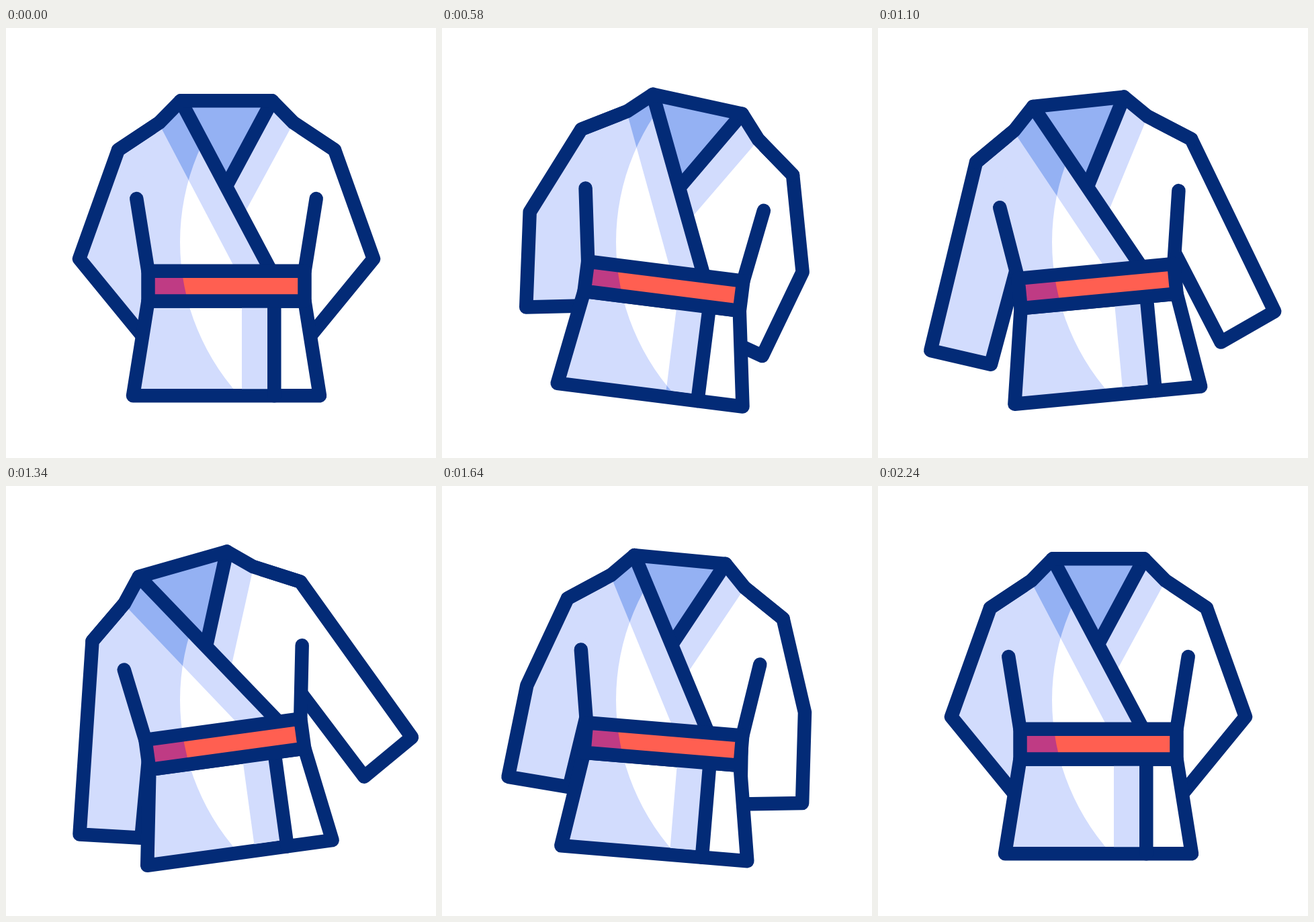
An HTML page with a canvas that plays this animation: 640x640 px, repeating every 2.62 s.

```html
<!DOCTYPE html>
<html lang="en">
<head>
<meta charset="utf-8">
<title>Kimono</title>
<style>
  html, body { margin: 0; width: 100%; height: 100%; overflow: hidden; background: #fff; }
  canvas { display: block; }
</style>
</head>
<body>
<canvas id="stage" width="640" height="640"></canvas>
<script>
const SIZE = 640, MID = 328, LOOP = 2620, STEP = 20, RAD = Math.PI / 180;
const INK = '#032b77';
const LIT = { cloth: '#fff', band: '#d2dcfd', lining: '#94b1f3', belt: '#ff5f51' };
const SHADE = { cloth: '#d2dcfd', band: '#94b1f3', lining: '#94b1f3', belt: '#bf3b84' };
const FOLD = 59; // elbow angle at rest

const stage = document.getElementById('stage').getContext('2d');
const layer = document.createElement('canvas');
layer.width = layer.height = SIZE;
const shaded = layer.getContext('2d');
let ctx = stage;

// Motion
const clamp = x => Math.min(1, Math.max(0, x));
const ease = (t, t0, t1) => (1 - Math.cos(Math.PI * clamp((t - t0) / (t1 - t0)))) / 2;

const swing = t => 8.2 * ease(t, 110, 720) - 17 * ease(t, 720, 1260)
  + 15.1 * ease(t, 1260, 1740) - 6.3 * ease(t, 1740, 2115);

const elbowBend = t =>
  FOLD * (1 - ease(t, 120, 1080) + clamp((t - 1380) / 850) ** 1.17);

// Points are measured from the vertical middle line
function turn([x, y], deg, cy) {
  const c = Math.cos(deg * RAD), s = Math.sin(deg * RAD);
  return [x * c - (y - cy) * s, cy + x * s + (y - cy) * c];
}
const polar = ([x, y], deg, r) => [x + r * Math.cos(deg * RAD), y + r * Math.sin(deg * RAD)];
const mirror = points => points.map(([x, y]) => [-x, y]);
const box = (x0, y0, x1, y1) => [[x0, y0], [x1, y0], [x1, y1], [x0, y1]];

function trace(points, closed) {
  ctx.beginPath();
  for (const [x, y] of points) ctx.lineTo(MID + x, y);
  if (closed) ctx.closePath();
}
function fill(points, color) {
  trace(points, true);
  ctx.fillStyle = color;
  ctx.fill();
}
function line(points, closed) {
  trace(points, closed);
  ctx.stroke();
}
function shape(points, color) {
  fill(points, color);
  line(points, true);
}

const COLLAR = [68, 108.3], NECK = [100, 141], SHOULDER = [161, 181.5], CROSS = [0, 235];
const RIGHT_HALF = [COLLAR, NECK, SHOULDER];
const WAIST = 116.5, BELT_TOP = 361.8, BELT_LOW = 406.4, HEM = 547.3, SLIT = 71.3;

function sleeve(side, bend) {
  const right = side > 0, slope = 70.3;
  const drift = side * 1.7 * Math.sin(Math.PI * bend / FOLD);
  const arm = slope + bend + drift;
  const elbow = polar(SHOULDER, slope + Math.max(0, drift), 142.5 + 0.0194 * (bend - 20) ** 2);
  const wrist = polar(elbow, arm, (right ? 134.5 : 138) + 0.004 * bend ** 2);
  const cuff = polar(wrist, arm + (right ? 86 : 90.5) + 0.1 * bend, 92);
  const points = [NECK, SHOULDER, elbow, wrist, cuff, [114, 335]];
  return right ? points : mirror(points);
}

function drawSuit(target, t, ink) {
  ctx = target;
  ctx.fillStyle = '#fff';
  ctx.fillRect(0, 0, SIZE, SIZE);
  ctx.lineWidth = 20.5;
  ctx.lineJoin = ctx.lineCap = 'round';
  ctx.strokeStyle = INK;

  // The chest follows the hips a little later
  const hips = swing(t), chest = 0.93 * swing(t - 100), bend = elbowBend(t);
  const low = points => points.map(p => turn(p, hips, 400));
  const up = points => low(points.map(p => turn(p, chest, 290)));

  for (const side of [-1, 1]) {
    const arm = up(sleeve(side, bend));
    fill(arm, ink.cloth);
    line(arm);
  }

  const seam = [[133.7, 254], [WAIST, BELT_TOP]];
  const seamR = low(seam), seamL = low(mirror(seam));
  const neckline = mirror(RIGHT_HALF).reverse().concat(RIGHT_HALF);
  fill([...up(neckline.slice(1, -1)), ...seamR, ...seamL.slice().reverse()], ink.cloth);
  fill(up([[-68, 108], [-101, 141], [24, 379], [76, 379]]), ink.band);
  fill(up([COLLAR, NECK, [24, 281], CROSS]), ink.band);
  fill(up([...mirror([COLLAR]), COLLAR, CROSS]), ink.lining);
  line(up([COLLAR, CROSS]));
  line(up([...mirror([COLLAR]), [74, 376]]));
  line(up(neckline));
  line(seamL);
  line(seamR);

  shape(low([[-WAIST, BELT_LOW], [WAIST, BELT_LOW], [139, HEM], [-139, HEM]]), ink.cloth);
  fill(low(box(23, BELT_LOW, SLIT, HEM - 10)), ink.band);
  line(low([[SLIT, BELT_LOW], [SLIT, HEM]]));
  shape(low(box(-WAIST, BELT_TOP, WAIST, BELT_LOW)), ink.belt);
}

function draw(t) {
  drawSuit(shaded, t, SHADE);
  drawSuit(stage, t, LIT);

  // Fixed shadow: everything left of a large circle
  stage.save();
  stage.beginPath();
  stage.rect(0, 0, SIZE, SIZE);
  stage.arc(599, 318.5, 340, 0, 2 * Math.PI);
  stage.clip('evenodd');
  stage.drawImage(layer, 0, 0);
  stage.restore();
}

const start = performance.now();
function frame() {
  const t = (performance.now() - start) % LOOP;
  draw(Math.floor(t / STEP) * STEP);
  requestAnimationFrame(frame);
}
frame();
</script>
</body>
</html>
```
